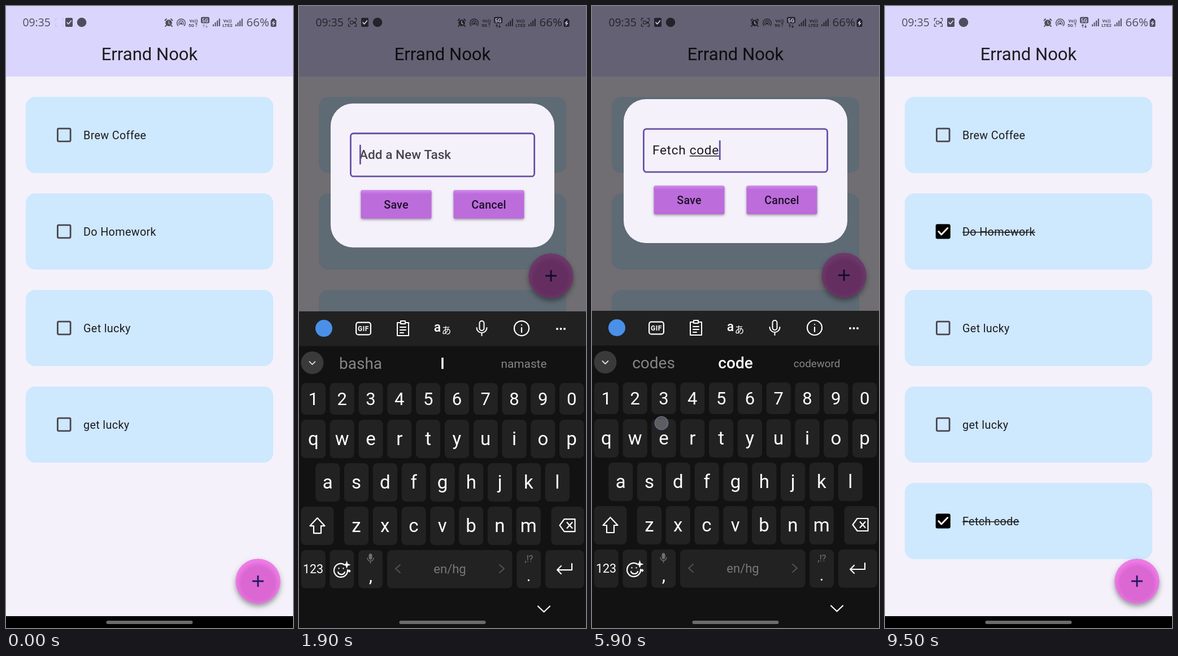
Write an HTML page with a canvas that moves like this. It is 508 px wide and 1102 px high and loops after 10000 ms.

```html
<!DOCTYPE html>
<html lang="en">
<head>
<meta charset="utf-8">
<title>Errand Nook</title>
<style>
  html, body { margin: 0; width: 100%; height: 100%; overflow: hidden; background: #000; }
  canvas { display: block; width: 508px; height: 1102px; }
</style>
</head>
<body>
<canvas id="stage"></canvas>
<script>
const W = 508, H = 1102, LOOP = 10000;
const canvas = document.getElementById('stage');
const ratio = window.devicePixelRatio || 1;
canvas.width = W * ratio;
canvas.height = H * ratio;
const c = canvas.getContext('2d');

const INK = '#1d1b20', PURPLE = '#6750a4', PAPER = '#f4f1fb', GREY = '#858585', KEY = '#222222';
const KEYBOARD_TOP = 540;
const TASKS = ['Brew Coffee', 'Do Homework', 'Get lucky', 'get lucky', 'Fetch code'];
const CHECKED_AT = { 1: 8000, 4: 8620 };
const SAVED_AT = 6700, FOCUS_AT = 1500, SHIFT_AT = 2600, UNSHIFT_AT = 3900;

// Each tap on a letter types it a moment later.
const KEY_DELAY = 100;
const keyTaps = [
  [3850, 215, 860, 'F'], [4050, 125, 752, 'e'], [4230, 229, 757, 't'], [4410, 205, 920, 'c'],
  [4590, 305, 850, 'h'], [4770, 262, 1003, ' '], [4980, 206, 918, 'c'], [5240, 430, 757, 'o'],
  [5530, 155, 848, 'd'], [5790, 123, 739, 'e']
];
const taps = [
  [380, 447, 1024], [1320, 240, 528], [2500, 34, 922], ...keyTaps,
  [6380, 176, 348], [7930, 104, 402], [8550, 104, 914]
];
// Suggestions: left word, right word, size of the right word.
const hints = {
  F: ['For', 'From', 21], Fe: ['Few', 'Feel', 21], Fet: ['Feta', 'Fetch', 21],
  Fetc: ['Fetch', 'Fetched', 20.5], Fetch: ['Fetching', 'Fetched', 20.5],
  c: ['can', 'come', 21], co: ['come', 'could', 21], cod: ['code', 'codes', 21],
  code: ['codes', 'codeword', 18.8]
};

const clamp = v => Math.max(0, Math.min(1, v));
const ramp = (t, start, length) => clamp((t - start) / length);
const easeOut = u => 1 - (1 - u) ** 3;
const mix = (a, b, u) => a + (b - a) * u;

function text(s, x, y, size, fill, { align = 'left', weight = 400, spacing = 0, family = 'Roboto' } = {}) {
  c.font = `${weight} ${size}px "${family}", "Noto Sans CJK JP", sans-serif`;
  c.letterSpacing = spacing + 'px';
  c.textAlign = align;
  c.fillStyle = fill;
  c.fillText(s, x, y);
  return c.measureText(s).width;
}

function rect(x, y, w, h, r, fill) {
  c.beginPath();
  c.roundRect(x, y, w, h, r);
  c.fillStyle = fill;
  c.fill();
}

function frame(x, y, w, h, r, color, width) {
  c.beginPath();
  c.roundRect(x + width / 2, y + width / 2, w - width, h - width, r);
  c.strokeStyle = color;
  c.lineWidth = width;
  c.stroke();
}

function disc(x, y, r, fill) {
  c.beginPath();
  c.arc(x, y, r, 0, 7);
  c.fillStyle = fill;
  c.fill();
}

// Path data is relative to the icon's centre.
function icon(d, x, y, color, width = 2, filled = false) {
  c.save();
  c.translate(x, y);
  c.lineCap = c.lineJoin = 'round';
  c.lineWidth = width;
  c.strokeStyle = c.fillStyle = color;
  const path = new Path2D(d);
  if (filled) c.fill(path);
  c.stroke(path);
  c.restore();
}

function shadowed(color, blur, dy, draw) {
  c.save();
  c.shadowColor = color;
  c.shadowBlur = blur * ratio;
  c.shadowOffsetY = dy * ratio;
  draw();
  c.restore();
}

function drawTask(label, i, t) {
  const y = 161 + 171 * i, mid = y + 67.5;
  const done = ramp(t, CHECKED_AT[i] ?? Infinity, 150);
  rect(35, y, 438, 135, 17, '#cee8fe');
  if (done > 0) {
    const ripple = 1 - ramp(t, CHECKED_AT[i] + 100, 250);
    disc(102.5, mid, 28 * done, `rgba(0,0,0,${0.1 * ripple})`);
  }
  frame(90, mid - 12.8, 25.5, 25.5, 2, '#49454f', 2.8);
  if (done > 0) {
    c.globalAlpha = done;
    rect(89.7, mid - 13, 26, 26, 3, '#000');
    icon('M-8 0 L-3 5.5 L8 -6', 102.8, mid, '#fff', 2.8);
    c.globalAlpha = 1;
  }
  const width = text(label, 137, mid + 7, 19.76, INK, { spacing: 0.35 });
  if (done > 0) rect(137, mid + 0.6, width, 1.5, 0, INK);
}

function drawFab(y) {
  shadowed('rgba(0,0,0,.38)', 10, 5, () => disc(446, y, 39.5, '#e070d8'));
  const glow = c.createRadialGradient(446, y + 4, 0, 446, y + 4, 42);
  glow.addColorStop(0.7, '#db67d2');
  glow.addColorStop(0.95, '#ee7ce6');
  disc(446, y, 39.5, glow);
  rect(436, y - 1.4, 20, 2.8, 0, '#21175a');
  rect(444.6, y - 10, 2.8, 20, 0, '#21175a');
}

function drawStatus(t) {
  const ink = 'rgba(0,0,0,.64)', faint = 'rgba(0,0,0,.3)', bold = { align: 'center', weight: 700 };
  const shift = t < 100 ? -5 : 0;
  const lit = t % 2000 >= 1400;
  text('09:35', 29.5, 36, 19.3, ink, { family: 'Open Sans' });
  icon('M-7 -3V-7H-4M4 -7H7V-3M7 3V7H4M-4 7H-7V3', 94.5, 29, t < 100 ? 'rgba(0,0,0,.07)' : ink, 1.3);
  if (lit) {
    frame(90, 26, 6.5, 6.5, 1, ink, 1.3);
    icon('M0 0L3 -2V2Z', 97, 29.3, ink, 0.8, true);
  }
  rect(110 + shift, 21, 13, 16, 2, ink);
  icon('M-3.5 0L-1 3L4 -3', 116.5 + shift, 29, '#dad5fd', 1.6);
  disc(139 + shift, 29, 8.3, ink);

  disc(288, 30, 5.8, ink);
  icon('M-6.5 -4L-4 -6.5M6.5 -4L4 -6.5M-4.5 5L-6 6.5M4.5 5L6 6.5', 288, 29.5, ink, 1.8);
  icon('M0 -3V1L2.5 2', 288, 30, '#c9c4e8', 1.1);
  icon('M-5.5 5.5A7.3 7.3 0 1 1 5.5 5.5M-3 3.5A4 4 0 1 1 3 3.5', 310, 29.5, ink, 1.5);
  disc(310, 31, 2, ink);
  for (const [x, label] of [[332, '5G↑'], [392, 'LTE2']]) {
    text('Vo))', x, 28.5, 8, ink, bold);
    text(label, x, 37, 8, ink, bold);
  }
  rect(345, 19.5, 15, 11, 2.5, ink);
  text('5G', 352.5, 28.6, 9, '#dad5fd', bold);
  icon('M-2.5 3V-2M-4 -.5L-2.5 -2L-1 -.5M2.5 -2V3M1 1.5L2.5 3L4 1.5', 352.5, 35, lit ? ink : faint, 1.1);
  for (const x of [366, 406])
    for (let i = 0; i < 4; i++) rect(x + 3.6 * i, 32.5 - 3.4 * i, 2, 3.5 + 3.4 * i, 0.5, ink);
  text('66%', 425.5, 36, 20.5, ink, { family: 'Open Sans' });
  rect(471, 22, 5, 3, 1, ink);
  rect(468.5, 24, 10, 13, 2.5, ink);
  icon('M1 -3L-2 .5H2L-1 4', 473.5, 30, '#dad5fd', 1.3);
}

function typedAt(t) {
  const typed = keyTaps.filter(k => t >= k[0] + KEY_DELAY);
  return {
    value: typed.map(k => k[3]).join(''),
    last: typed.length ? typed.at(-1)[0] + KEY_DELAY : FOCUS_AT
  };
}

function drawButton(x, y, label) {
  shadowed('rgba(0,0,0,.35)', 4, 2, () => rect(x, y, 125, 50.5, 3, '#bd6cdb'));
  const shine = c.createLinearGradient(0, y, 0, y + 7);
  shine.addColorStop(0, '#d08bec');
  shine.addColorStop(1, '#bd6cdb');
  rect(x, y, 125, 7, [3, 3, 0, 0], shine);
  text(label, x + 62.5, y + 32.5, 19.76, '#1c1128', { align: 'center', weight: 500, spacing: 0.14 });
}

function drawDialog(t, top, { value, last }) {
  const focused = t >= FOCUS_AT;
  rect(56, top, 396, 255, 39.5, PAPER);
  frame(90, top + 51.5, 328, 79, 5, focused ? PURPLE : '#79747e', focused ? 2.8 : 1.4);
  let caretX = 107;
  if (value) {
    const style = { spacing: 0.7 };
    const width = text(value, 107, top + 98, 22.58, INK, style);
    const word = value.split(' ').pop();
    const wordWidth = c.measureText(word).width;
    caretX += width;
    rect(caretX - wordWidth, top + 100, wordWidth, 1.5, 0, INK);
  } else {
    text('Add a New Task', 107, top + 98, 22.58, '#49454f', { weight: 500 });
  }
  if (focused && (t - last) % 1000 < 500) rect(caretX, top + 73, 2.8, 35, 1, PURPLE);
  drawButton(109.5, top + 153.5, 'Save');
  drawButton(273.5, top + 153.5, 'Cancel');
}

function drawToolbar() {
  rect(0, 0, W, 61.5, 0, '#212121');
  disc(44, 30, 15, '#4a90e8');
  frame(100, 18.5, 28, 24, 4, '#fff', 2.2);
  text('GIF', 114, 35, 12, '#fff', { align: 'center', weight: 700, spacing: 0.5 });
  icon('M-4 -10H-10V13H10V-10H4M-4 -13H4V-8H-4ZM-5 -2H5M-5 3H5M-5 8H1', 184, 30, '#fff', 2);
  text('a', 245, 36, 23, '#fff', { align: 'center', weight: 500 });
  text('あ', 261, 40, 17, '#fff', { align: 'center', weight: 500, family: 'Noto Sans CJK JP' });
  icon('M-4 -9A4 4 0 0 1 4 -9V0A4 4 0 0 1 -4 0ZM-9 -1A9 9 0 0 0 9 -1M0 8V13', 323.5, 30, '#fff', 2);
  icon('M-13 0A13 13 0 1 1 13 0A13 13 0 1 1 -13 0M0 -1V7M0 -6V-5.8', 394, 30, '#fff', 2.2);
  for (const dx of [-6.5, 0, 6.5]) disc(463.5 + dx, 31, 2, '#fff');
}

function drawSuggestions(t, { value }) {
  const word = value.split(' ').pop();
  const idle = value ? ['the', 'me', 21] : t >= SHIFT_AT ? ['Basha', 'Namaste', 20] : ['basha', 'namaste', 20.8];
  const [left, right, size] = hints[word] || idle;
  disc(23.5, 91, 20, '#3a3a3a');
  icon('M-5 -2.5L0 2.5L5 -2.5', 23.5, 91.5, '#ddd', 1.8);
  text(left, 109, 102, 28, GREY, { align: 'center' });
  text(word || (value ? 'to' : 'I'), 254, 102, 28, '#fff', { align: 'center', weight: 500 });
  text(right, 398, 100, size, GREY, { align: 'center' });
}

function drawKeys(t) {
  const shifted = t >= SHIFT_AT && t < UNSHIFT_AT;
  const rows = [['1234567890', 25.4, 127, 56, 31, 11], ['qwertyuiop', 25.4, 192, 68, 33, 10.5],
                ['asdfghjkl', 50.8, 269, 68, 33, 10.5], ['zxcvbnm', 101.4, 346, 68, 33, 10.5]];
  for (const [letters, firstX, y, h, size, drop] of rows)
    [...letters].forEach((letter, i) => {
      const x = firstX + 50.8 * i;
      rect(x - 21.6, y, 43.2, h, 8, KEY);
      text(shifted ? letter.toUpperCase() : letter, x, y + h / 2 + drop, size, '#fff', { align: 'center' });
    });

  for (const x of [3.5, 446.5]) rect(x, 346, 58, 68, 8, KEY);
  icon('M0 -14L13 0H6.5V13H-6.5V0H-13Z', 32.5, 380, '#fff', 2.2, shifted);
  icon('M-14 0L-6 -11H13V11H-6ZM-1 -5L8 5M8 -5L-1 5', 475.5, 379, '#fff', 2.2);

  for (const [x, w] of [[3.8, 43], [54.4, 43], [105.2, 43], [156, 221.5], [385.2, 43], [436, 68.5]])
    rect(x, 423, w, 67.5, 8, KEY);
  text('123', 25, 464, 21.5, '#fff', { align: 'center' });
  icon('M4 -10A12 12 0 1 0 11 0M-6 4A6.5 6.5 0 0 0 6 4M-4.5 -3V-2.5M3.5 -3V-2.5', 75, 458, '#fff', 2.2);
  icon('M0 -6L1.5 -1.5L6 0L1.5 1.5L0 6L-1.5 1.5L-6 0L-1.5 -1.5Z', 84.5, 449, '#fff', 0.8, true);
  icon('M0 -2.5L2.5 0L0 2.5L-2.5 0Z', 89, 460, '#fff', 0.5, true);
  icon('M-2.5 -5A2.5 2.5 0 0 1 2.5 -5V0A2.5 2.5 0 0 1 -2.5 0Z', 126.5, 437, '#707070', 1, true);
  icon('M-5.5 -1A5.5 5.5 0 0 0 5.5 -1M0 5V8', 126.5, 438, '#707070', 1.5);
  text(',', 127, 479, 32, '#fff', { align: 'center' });
  icon('M4 -7L-4 0L4 7', 175, 456, '#555', 1.8);
  icon('M-4 -7L4 0L-4 7', 359, 456, '#555', 1.8);
  text('en/hg', 267, 464, 22, '#777', { align: 'center' });
  text(',!?', 407, 444, 16, '#777', { align: 'center' });
  text('.', 406.5, 478, 29, '#fff', { align: 'center' });
  icon('M13 -9V2H-13M-6 -5L-13 2L-6 9', 470, 456, '#fff', 2.2);
  icon('M-10.5 -5L0 5L10.5 -5', 433.5, 527.5, '#fff', 2.2);
}

function drawKeyboard(t, top, typed) {
  c.save();
  c.translate(0, top);
  rect(0, 0, W, H - KEYBOARD_TOP + 1, 0, '#121212');
  drawToolbar();
  drawSuggestions(t, typed);
  drawKeys(t);
  c.restore();
}

function drawTaps(t) {
  for (const [start, x, y] of taps) {
    if (t < start || t > start + 180) continue;
    c.globalAlpha = 1 - ramp(t, start + 60, 120);
    disc(x, y, 12, 'rgba(150,150,155,.9)');
    frame(x - 12.5, y - 12.5, 25, 25, 12, '#7280b0', 1.5);
    c.globalAlpha = 1;
  }
}

function draw(t) {
  c.setTransform(ratio, 0, 0, ratio, 0, 0);
  const typed = typedAt(t);
  const leaving = t >= SAVED_AT;
  const keysUp = leaving ? 1 - easeOut(ramp(t, 6820, 400)) : easeOut(ramp(t, 1550, 400));
  const lift = leaving ? 1 - easeOut(ramp(t, 6840, 400)) : easeOut(ramp(t, 1610, 420));
  const shown = leaving ? 1 - ramp(t, SAVED_AT, 200) : easeOut(ramp(t, 430, 220));
  const keyTop = mix(H, KEYBOARD_TOP, keysUp);

  rect(0, 0, W, H, 0, PAPER);
  TASKS.slice(0, leaving ? 5 : 4).forEach((label, i) => drawTask(label, i, t));
  drawFab(Math.min(1019, keyTop - 63));
  rect(0, 0, W, 125, 0, '#dad5fd');
  text('Errand Nook', 254, 95.5, 31.05, INK, { align: 'center' });
  rect(0, 0, W, H, 0, `rgba(0,0,0,${0.54 * shown})`);
  drawStatus(t);
  rect(0, 1081, W, 21, 0, '#000');

  if (shown > 0) {
    c.globalAlpha = shown;
    drawDialog(t, mix(436, 165, lift), typed);
    c.globalAlpha = 1;
  }
  if (keysUp > 0) drawKeyboard(t, keyTop, typed);
  rect(177.5, 1089, 153, 6, 3, '#6b6b6b');
  drawTaps(t);
}

function tick() {
  draw(performance.now() % LOOP);
  requestAnimationFrame(tick);
}
tick();
</script>
</body>
</html>
```
